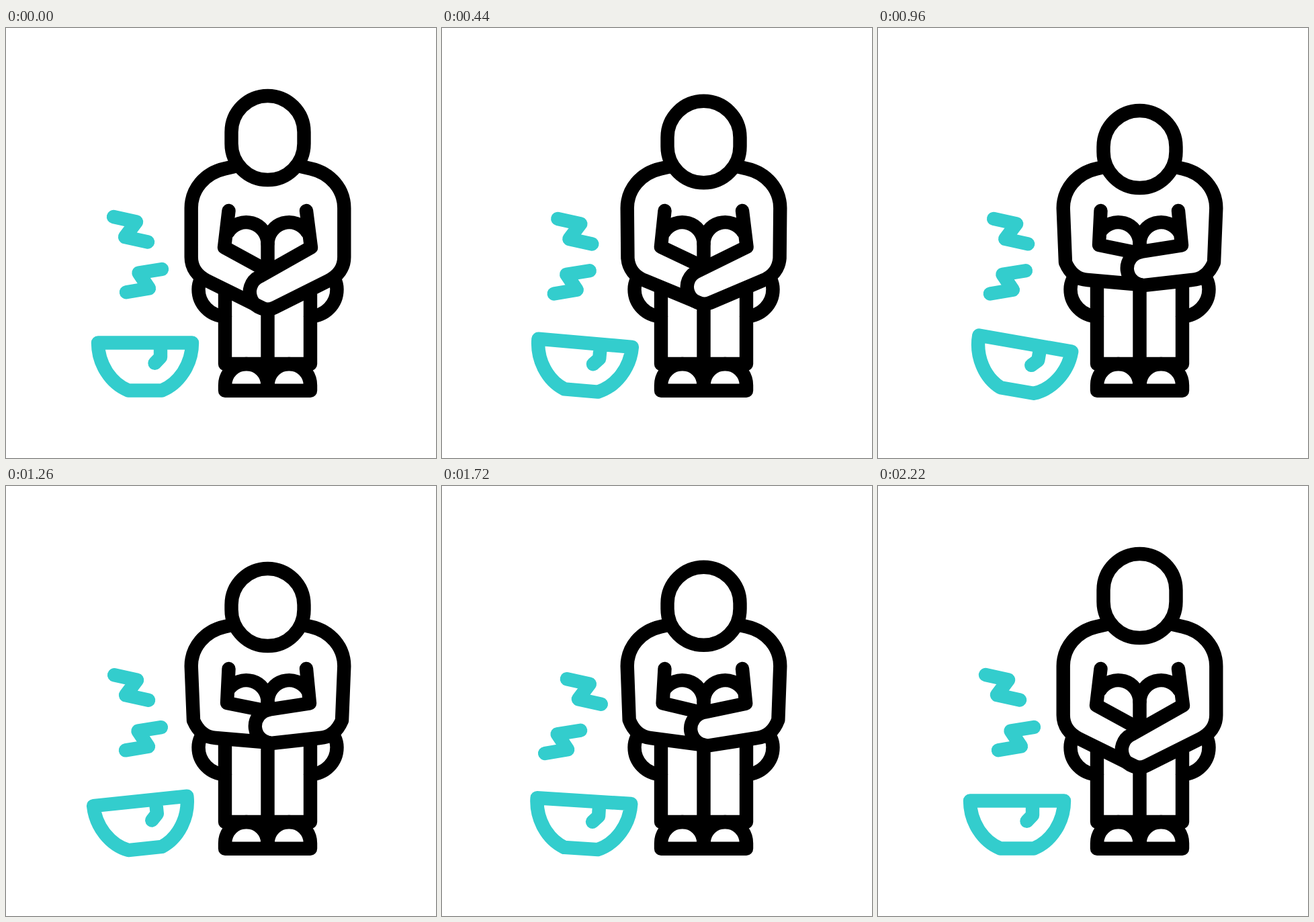
An HTML page that plays this animation: 640 px wide and 640 px high, repeating every 2.4 s.

```html
<!DOCTYPE html>
<html>
<head>
<meta charset="utf-8">
<style>
html, body { margin: 0; height: 100%; overflow: hidden; background: #fff; }
svg { display: block; width: 100%; height: 100%; fill: none; stroke: #000; stroke-width: 20.4; stroke-linecap: round; stroke-linejoin: round; }
.teal { stroke: #33cdcd; }
</style>
</head>
<body>
<svg viewBox="0 0 640 640">
  <!-- hips, feet, knees -->
  <path d="M290 374Q286.5 381 286.5 389A40 40 0 0 0 326 429M489 374Q492.5 381 492.5 389A40 40 0 0 1 453 429"/>
  <path d="M326 539.7V531.7A31.75 31.75 0 0 1 389.5 531.7A31.75 31.75 0 0 1 453 531.7V539.7ZM389.5 500V539.7"/>
  <path d="M330.5 304A32 32 0 0 1 389.5 321A32 32 0 0 1 448.5 304"/>
  <path id="legs"/>
  <path id="leftArm"/>
  <path id="rightArm"/>
  <rect id="head" x="335.5" width="108" rx="54"/>
  <g class="teal">
    <path id="upperZig" d="M160 281L194 288.5L177 311L211 318.5"/>
    <path id="lowerZig" d="M232 359L197.5 364.5L213 387.5L179 393.2"/>
    <path id="bowl" d="M137 468.5H277C277 500 258 529 232 539.5H182C156 529 137 500 137 468.5ZM230 470V490L221.5 498.8"/>
  </g>
</svg>
<script>
const LOOP = 2400;
const el = id => document.getElementById(id);
const lerp = (a, b, p) => a + (b - a) * p;

// Value at time t along [time, value] keys, eased in and out between them
function track(t, keys) {
  if (t <= keys[0][0]) return keys[0][1];
  for (let i = 1; i < keys.length; i++) {
    const [t0, a] = keys[i - 1], [t1, b] = keys[i];
    if (t < t1) {
      const u = (t - t0) / (t1 - t0);
      return lerp(a, b, u * u * (3 - 2 * u));
    }
  }
  return keys[keys.length - 1][1];
}

// Blend two paths of the same structure
function morph(from, to, p) {
  const target = to.match(/[\d.]+/g);
  let i = 0;
  return from.replace(/[\d.]+/g, n => lerp(+n, +target[i++], p));
}

const poses = {
  legs: [
    'M326 394L326 500L453 500L453 394M389.5 321L389.5 352M389.5 420L389.5 500',
    'M326 382L326 500L453 500L453 382M389.5 321L389.5 329M389.5 382L389.5 500'],
  leftArm: [
    'M340 206L325 209.5C296 216 275.7 240 275.7 268L275.7 341C275.7 357 285 369 299 376L385 418.5M331.5 272L325 326.5L379 356',
    'M340 206L325 209.5C296 216 275.7 240 275.7 268L279 349C285 363 295 374 312 375L389 381.5M331.5 272L329 323L379 333'],
  rightArm: [
    'M447 272L454 326.5L377 370A20 20 0 0 0 400 416L480 376C494 369 503.3 357 503.3 341L503.3 268C503.3 240 483 216 454 209.5L439 206',
    'M447 272L452 323.5L393 332.5A20 20 0 0 0 399 382.5L467 375C484 374 494 363 500 349L503.3 268C503.3 240 483 216 454 209.5L439 206']
};

function draw(now) {
  const t = now % LOOP;

  const nod = track(t, [[200, 0], [800, 1], [1600, 1], [2200, 0]]);
  el('head').setAttribute('y', lerp(101, 123, nod));
  el('head').setAttribute('height', lerp(125, 115, nod));

  const squeeze = track(t, [[200, 0], [1000, 1], [1600, 1], [2200, 0]]);
  for (const id in poses) el(id).setAttribute('d', morph(...poses[id], squeeze));

  const sway = track(t, [[200, 0], [700, 1], [1200, 0], [1700, 1], [2200, 0]]);
  el('upperZig').setAttribute('transform', `translate(${26 * sway} ${6.2 * sway})`);
  el('lowerZig').setAttribute('transform', `translate(${-26 * sway} ${4.8 * sway})`);

  const tilt = track(t, [[200, 0], [800, 14], [1400, -9], [1800, 5], [2200, 0]]);
  el('bowl').setAttribute('transform', `rotate(${tilt} 207 539.5)`);

  requestAnimationFrame(draw);
}
draw(0);
</script>
</body>
</html>
```
